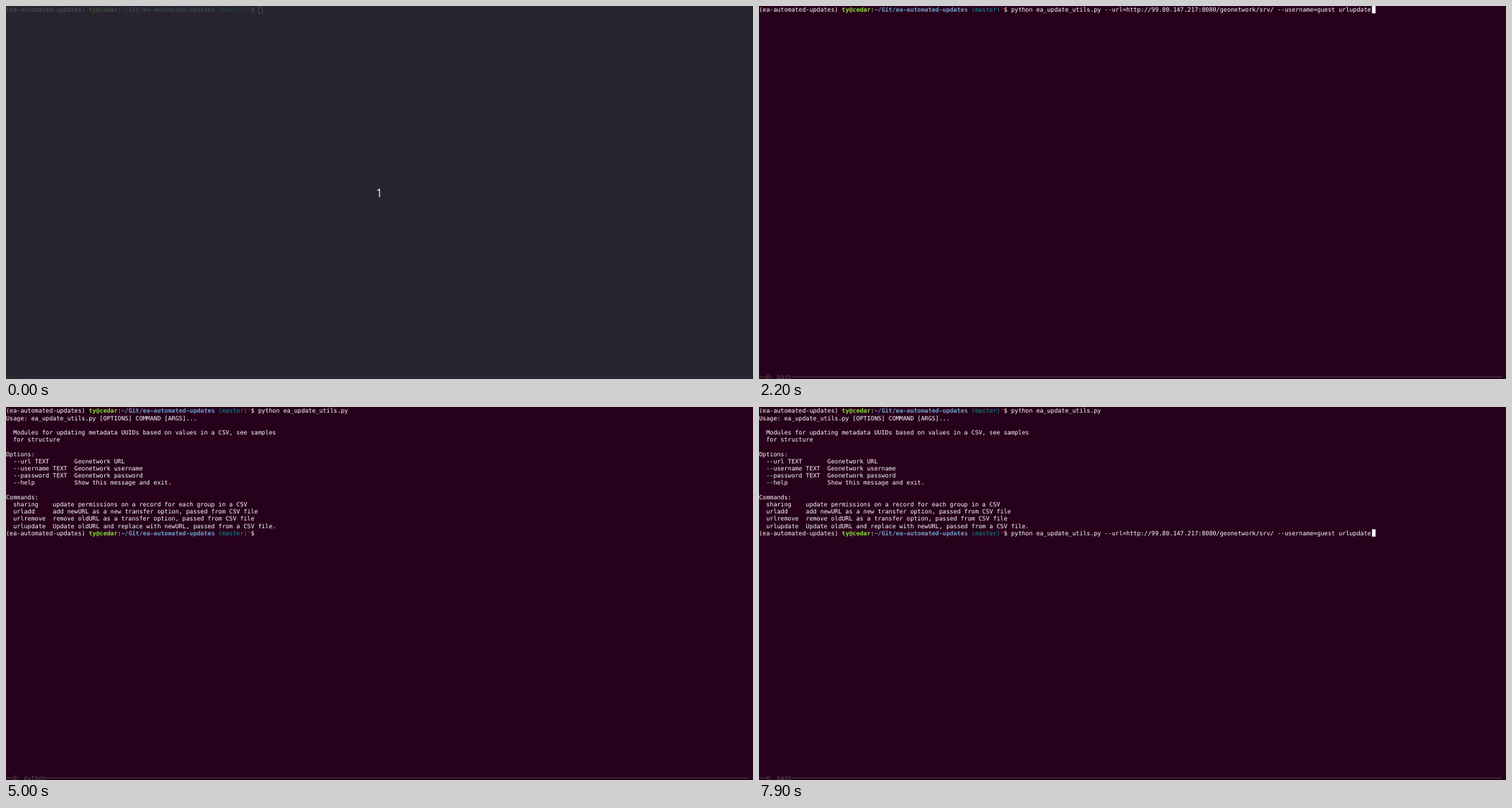
An HTML page that plays this animation: 1058x529 px, repeating every 8 s.

```html
<!DOCTYPE html>
<html lang="en">
<head>
<meta charset="utf-8">
<title>Terminal session</title>
<style>
  html, body { margin: 0; width: 100%; height: 100%; overflow: hidden; background: #27001b; }
  svg { display: block; width: 100vw; height: 100vh; }
  text { white-space: pre; }
  .term { font-family: "DejaVu Sans Mono", monospace; font-size: 8.483px; fill: #fff; text-rendering: geometricPrecision; }
  .user { fill: #8ae234; font-weight: bold; }
  .path { fill: #729fcf; font-weight: bold; }
  .branch { fill: #06989a; }
  .dirty { fill: #cc0000; }
  .status { fill: #555753; }
  .count { font: 16px "Noto Sans", "Open Sans", sans-serif; fill: #e6e6e6; text-anchor: middle; }
</style>
</head>
<body>
<svg id="stage" viewBox="0 0 1058 529" xmlns="http://www.w3.org/2000/svg"></svg>
<script>
const LOOP = 8000;
const COL = 5.107, ROW = 10.2, BASE = 8.4;
const HELP_ROW = 1, NEXT_ROW = 17, STATUS_ROW = 51;
const PROMPT_COLS = 70, LINE_END_COL = 206;

const SCRIPT = 'python ea_update_utils.py ';
const FULL = SCRIPT + '--url=http://99.80.147.217:8080/geonetwork/srv/ --username=guest urlupdate';

const PROMPT = [
  ['', '(ea-automated-updates) '],
  ['user', 'ty@cedar'],
  ['', ':'],
  ['path', '~/Git/ea-automated-updates'],
  ['branch', ' (master)'],
  ['dirty', '*'],
  ['', '$ ']
];

const HELP = `Usage: ea_update_utils.py [OPTIONS] COMMAND [ARGS]...

  Modules for updating metadata UUIDs based on values in a CSV, see samples
  for structure

Options:
  --url TEXT       Geonetwork URL
  --username TEXT  Geonetwork username
  --password TEXT  Geonetwork password
  --help           Show this message and exit.

Commands:
  sharing    update permissions on a record for each group in a CSV
  urladd     add newURL as a new transfer option, passed from CSV file
  urlremove  remove oldURL as a transfer option, passed from CSV file
  urlupdate  Update oldURL and replace with newURL, passed from a CSV file.`;

// Each entry changes part of the session state from its time onwards.
const EVENTS = [
  [0, { first: '', second: '', job: 'bash', row: 0, cursor: 'hollow', intro: true, done: false }],
  [200, { intro: false }],
  [500, { cursor: 'block' }],
  [800, { cursor: 'off' }],
  [1400, { cursor: 'block' }],
  [2200, { first: FULL }],
  [2800, { cursor: 'off' }],
  [3300, { cursor: 'block' }],
  [3500, { first: SCRIPT }],
  [3900, { cursor: 'off' }],
  [4200, { row: 1, cursor: 'block', job: 'python' }],
  [4800, { cursor: 'off' }],
  [5000, { row: NEXT_ROW, done: true }],
  [5200, { job: 'bash' }],
  [5400, { cursor: 'block' }],
  [6000, { cursor: 'off' }],
  [6600, { cursor: 'block' }],
  [6700, { second: SCRIPT }],
  [7500, { cursor: 'off' }],
  [7800, { cursor: 'block' }],
  [7900, { second: FULL }]
];

const stage = document.getElementById('stage');

function add(parent, tag, attrs = {}, content = '') {
  const el = document.createElementNS('http://www.w3.org/2000/svg', tag);
  for (const key in attrs) el.setAttribute(key, attrs[key]);
  el.textContent = content;
  return parent.appendChild(el);
}

function show(el, visible) {
  el.style.display = visible ? '' : 'none';
}

function textAt(parent, col, row, content = '', cls = '') {
  return add(parent, 'text', { x: col * COL, y: row * ROW + BASE, class: cls }, content);
}

// Draws the shell prompt and returns the span that holds the typed command.
function promptLine(parent, row) {
  const line = textAt(parent, 0, row);
  for (const [cls, part] of PROMPT) add(line, 'tspan', { class: cls }, part);
  return add(line, 'tspan');
}

add(stage, 'rect', { width: 1058, height: 529, fill: '#27001b' });
const term = add(stage, 'g', { class: 'term' });
const first = promptLine(term, 0);
const output = add(term, 'g');
HELP.split('\n').forEach((line, i) => textAt(output, 0, HELP_ROW + i, line));
const second = promptLine(output, NEXT_ROW);

const lineY = STATUS_ROW * ROW + 5.8;
const rule = { stroke: '#555753', 'stroke-width': 0.8, y1: lineY, y2: lineY };
add(term, 'line', { ...rule, x1: 0, x2: 2 * COL });
const ruleRight = add(term, 'line', { ...rule, x2: LINE_END_COL * COL });
const job = textAt(term, 2, STATUS_ROW, '', 'status');

const block = add(term, 'rect', { width: COL, height: 10.4, fill: '#fff' });
const hollow = add(term, 'rect', {
  x: PROMPT_COLS * COL + 0.3, y: 0.3, width: 5.2, height: 10.1,
  fill: 'none', stroke: '#fff', 'stroke-width': 0.8
});

const intro = add(stage, 'g');
add(intro, 'rect', { width: 1058, height: 529, fill: '#282d35', opacity: 0.8 });
add(intro, 'text', { x: 528.7, y: 270.5, class: 'count' }, '1');

function stateAt(time) {
  return Object.assign({}, ...EVENTS.filter(([at]) => at <= time).map(([, change]) => change));
}

function cursorCol({ row, first, second }) {
  if (row === 0) return PROMPT_COLS + first.length;
  return row === NEXT_ROW ? PROMPT_COLS + second.length : 0;
}

function draw(time) {
  const s = stateAt(time);
  first.textContent = s.first;
  second.textContent = s.second;
  const label = '0: ' + s.job;
  job.textContent = label;
  ruleRight.setAttribute('x1', (2 + label.length) * COL);
  block.setAttribute('x', cursorCol(s) * COL);
  block.setAttribute('y', s.row * ROW);
  show(block, s.cursor === 'block');
  show(hollow, s.cursor === 'hollow');
  show(output, s.done);
  show(intro, s.intro);
}

const start = performance.now();
function tick() {
  draw((performance.now() - start) % LOOP);
  requestAnimationFrame(tick);
}
tick();
</script>
</body>
</html>
```
